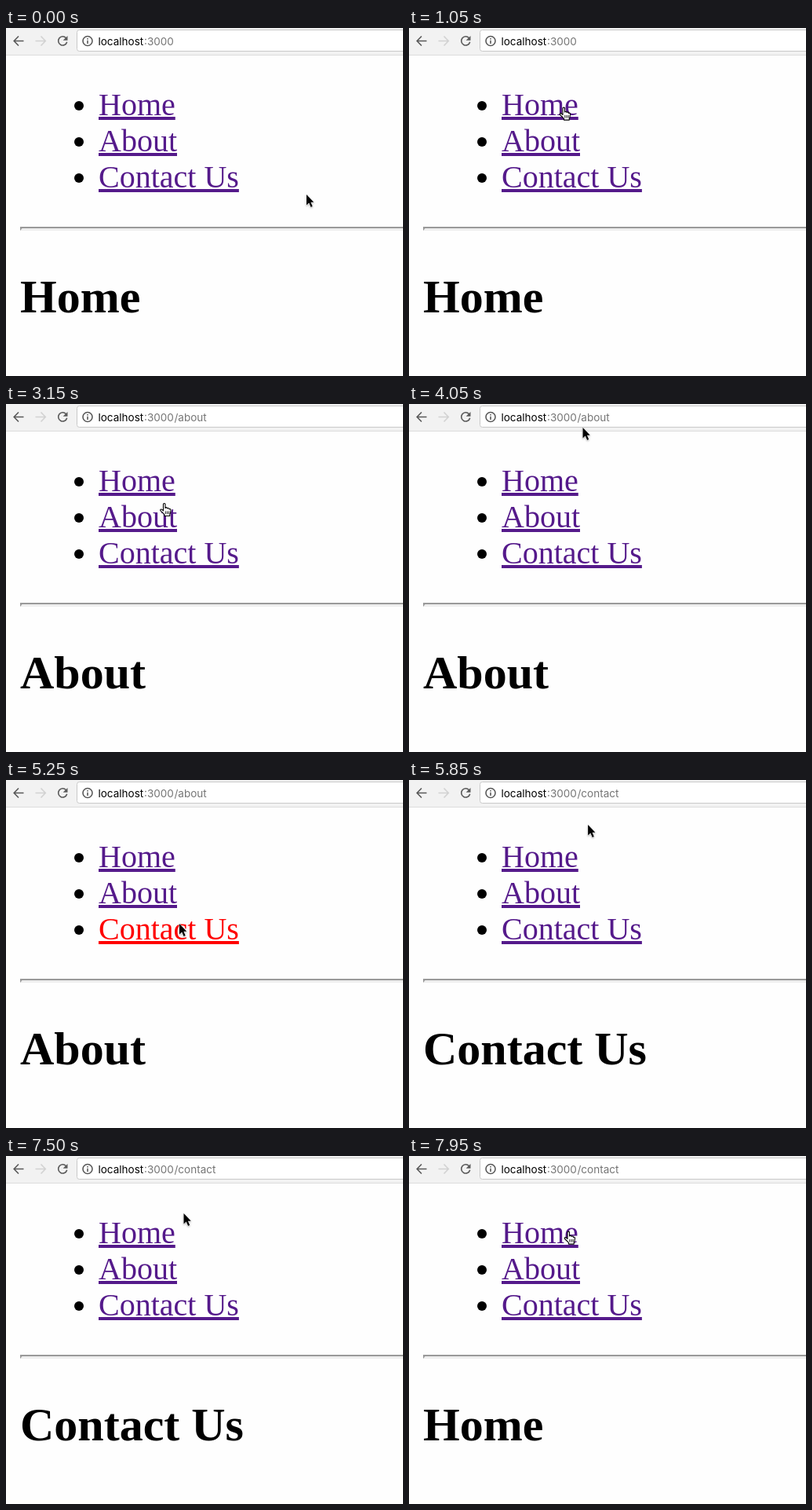
An HTML page that plays this animation: 506x443 px, repeating every 8 s.

```html
<!DOCTYPE html>
<html lang="en">
<head>
<meta charset="utf-8">
<title>Page navigation</title>
<style>
  html, body { margin: 0; width: 100%; height: 100%; overflow: hidden; background: #fefefe; }
  svg { display: block; width: 506px; height: 443px; }
  .url { font: 13.5px Inter, Roboto, sans-serif; fill: #757575; }
  .host { fill: #000; }
  .link { font: 40px "Liberation Serif", "Times New Roman", serif; fill: #551a8b; }
  .link.active { fill: #f00; }
  .title { font: bold 60px "Liberation Serif", "Times New Roman", serif; }
  .icon { fill: none; stroke: #5a5a5a; stroke-width: 1.6; }
  .off { stroke: #d2d2d2; }
  .solid { fill: #5a5a5a; }
  #arrow { filter: drop-shadow(0 1px 1px rgba(0, 0, 0, .3)); }
</style>
</head>
<body>
<svg viewBox="0 0 506 443">
  <rect width="506" height="35" fill="#f2f2f2"/>
  <rect y="34" width="506" height="1" fill="#dcdcdc"/>
  <rect x="90.5" y="2.5" width="430" height="27" rx="3" fill="#fff" stroke="#c9c9c9"/>
  <g transform="translate(.5 .5)">
    <path class="icon" d="M22 16H10M15.5 10L9.7 16l5.8 6"/>
    <path class="icon off" d="M37 16h12.5M44 10l5.8 6l-5.8 6"/>
    <path class="icon" d="M76 12.2A5.600 5.600 0 1 0 77.200 17.300"/>
    <path class="solid" d="M78 9.500v5.800h-5.800z"/>
    <circle class="icon" cx="103.5" cy="16" r="6"/>
    <path class="solid" d="M102.700 12.500h1.600v1.600h-1.600zM102.700 15.200h1.600v4.300h-1.600z"/>
    <text class="url" y="21"><tspan class="host" x="117">localhost</tspan><tspan x="175.5">:3000</tspan><tspan id="path" x="214"></tspan></text>
  </g>

  <g id="list"></g>
  <rect x="18" y="253" width="488" height="5" fill="#eee"/>
  <path d="M18 253H506v2H20.500L18 258z" fill="#9a9a9a"/>
  <text class="title" id="title" x="18" y="362"></text>

  <path id="arrow" d="M0 0V13.500L3.200 10.600L5.600 16L7.700 15L5.400 9.800H9.300Z" stroke="#fff" paint-order="stroke"/>
  <g id="hand" stroke="#000" stroke-width="1.100" stroke-linejoin="round">
    <path fill="#fff" d="M-1 9.500V1.500Q-1 .1 .3 .1Q1.500 .1 1.500 1.500V6Q1.800 5.100 2.800 5.200Q3.900 5.300 4 6.500Q4.500 5.900 5.500 6.100Q6.500 6.400 6.500 7.500Q7.100 7 8 7.400Q8.700 7.800 8.500 9L8.100 12Q7.900 13.100 7.300 14V16.100H.5V14.500Q-1.300 12.300-4.500 9.500Q-5.200 8.100-3.900 7.600Q-2.700 7.400-1 9.500Z"/>
    <path d="M1.800 10v3.600M4 10v3.600M6.100 10v3.600" stroke-width=".9"/>
  </g>
</svg>
<script>
  const LOOP = 8000, TICK = 150;
  const LEFT = 118, TOP = 76, ROW = 46;
  const $ = id => document.getElementById(id);
  const names = ['Home', 'About', 'Contact Us'];

  $('list').innerHTML = names.map((name, i) => `
    <g transform="translate(${LEFT} ${TOP + i * ROW})">
      <circle cx="-25" cy="23" r="6"/>
      <g class="link"><text y="35">${name}</text><rect y="37" height="4"/></g>
    </g>`).join('');
  const links = [...document.querySelectorAll('.link')];
  const widths = links.map(link => {
    const [text, line] = link.children, width = text.getComputedTextLength();
    line.setAttribute('width', width);
    return width;
  });

  // each click shows its page one tick later, and its address at pathAt
  const clicks = [
    { page: 0, at: -LOOP, pathAt: -LOOP, path: '' },
    { page: 1, at: 2400, pathAt: 2550, path: '/about' },
    { page: 2, at: 5250, pathAt: 5550, path: '/contact' },
    { page: 0, at: 7800, pathAt: LOOP, path: '' }
  ];
  const last = test => clicks.filter(test).pop();

  // pointer moves: start, end, x, y
  const rest = [383, 212];
  const moves = [
    [450, 1050, 197, 101],
    [1950, 2250, 193.5, 143],
    [3000, 3600, 248, 30],
    [3600, 4050, 221.5, 30],
    [4050, 4350, 248, 30],
    [4500, 5100, 221, 183],
    [5550, 6000, 230.5, 15],
    [6000, 6300, 250, 29],
    [6300, 6600, 230, 29],
    [6600, 6900, 255, 29],
    [7200, 7500, 226.5, 73],
    [7500, 7800, 203, 96]
  ];

  const ease = k => (1 - Math.cos(Math.PI * Math.min(1, Math.max(0, k)))) / 2;

  function pointer(t) {
    let [x, y] = rest;
    for (const [start, end, toX, toY] of moves) {
      const k = ease((t - start) / (end - start));
      x += (toX - x) * k;
      y += (toY - y) * k;
    }
    return [x, y];
  }

  function overLink(x, y) {
    const row = Math.floor((y - TOP) / ROW);
    return x >= LEFT && x <= LEFT + widths[row];
  }

  function draw(now) {
    const t = Math.floor((now % LOOP) / TICK) * TICK;
    const [x, y] = pointer(t);
    const click = last(c => c.at <= t);
    const pressed = t < click.at + TICK ? click.page : -1;
    $('title').textContent = names[last(c => c.at + TICK <= t).page];
    $('path').textContent = last(c => c.pathAt <= t).path;
    links.forEach((link, i) => link.classList.toggle('active', i === pressed));

    const isHand = overLink(x, y) && pressed !== 2;
    for (const id of ['arrow', 'hand']) {
      $(id).setAttribute('transform', `translate(${x} ${y})`);
      $(id).style.display = (id === 'hand') === isHand ? '' : 'none';
    }
  }

  let start;
  function frame(now) {
    start ??= now;
    draw(now - start);
    requestAnimationFrame(frame);
  }
  draw(0);
  requestAnimationFrame(frame);
</script>
</body>
</html>
```
